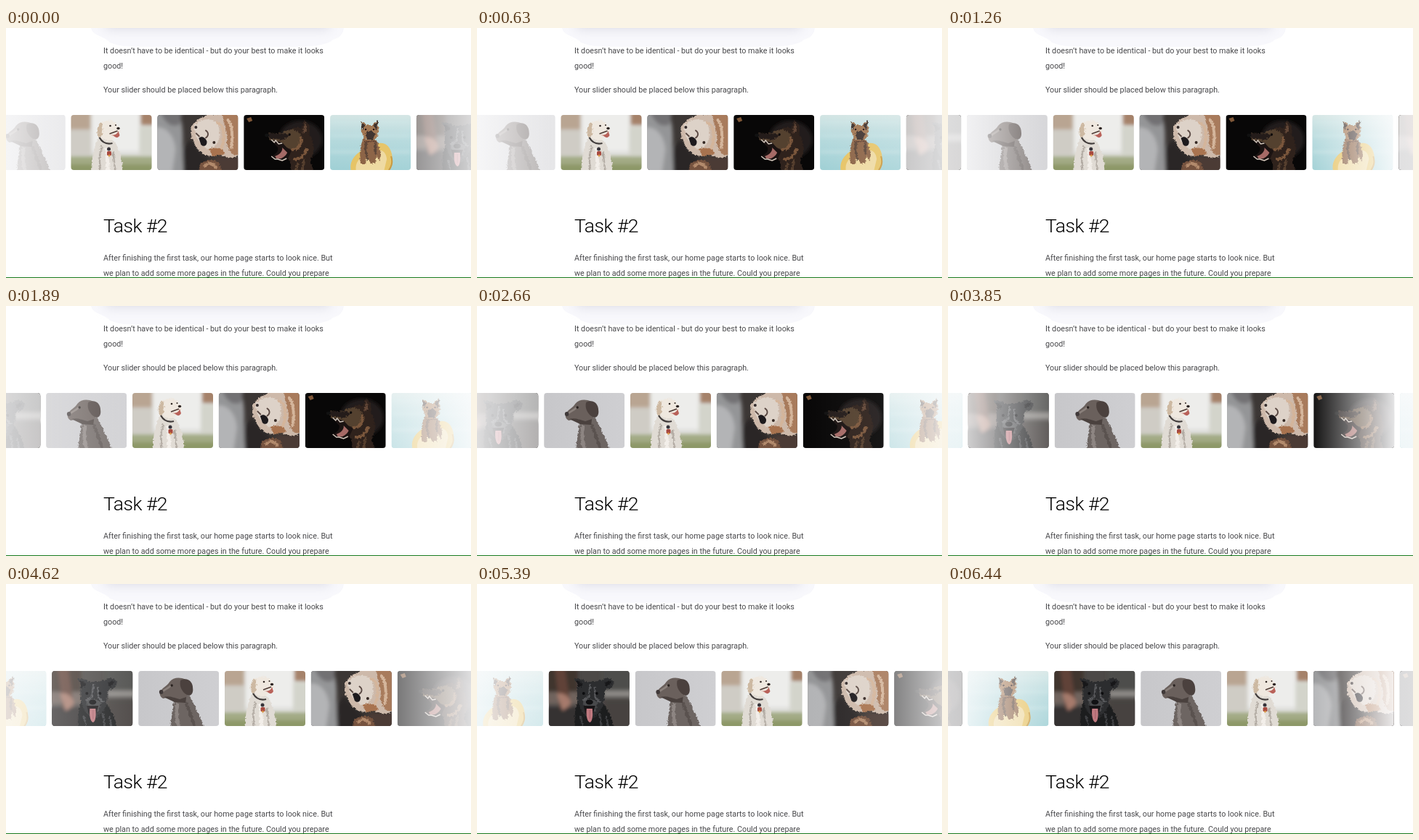
An HTML page that plays this animation: 640 px wide and 345 px high, repeating every 6510 ms.

```html
<!DOCTYPE html>
<html lang="en">
<head>
<meta charset="utf-8">
<title>Slider task</title>
<style>
  html, body { margin: 0; width: 100%; height: 100%; overflow: hidden; background: #fff; }
  svg { display: block; }
  .copy { font: 10.75px Roboto, sans-serif; fill: #48484b; }
  .title { font: 300 26.5px Roboto, sans-serif; letter-spacing: -.5px; fill: #000; }
</style>
</head>
<body>
<svg id="stage" width="640" height="345" viewBox="0 0 640 345" xmlns="http://www.w3.org/2000/svg">
  <defs>
    <clipPath id="frame"><rect width="111" height="76" rx="4"/></clipPath>
    <filter id="fur" x="-10%" y="-10%" width="120%" height="120%" color-interpolation-filters="sRGB">
      <feTurbulence baseFrequency=".22" numOctaves="2" seed="4" result="noise"/>
      <feDisplacementMap in="SourceGraphic" in2="noise" scale="4" xChannelSelector="R" yChannelSelector="G"/>
      <feGaussianBlur stdDeviation=".6"/>
    </filter>
    <filter id="soft" x="-10%" y="-10%" width="120%" height="120%"><feGaussianBlur stdDeviation=".6"/></filter>
    <filter id="blur" x="-20%" y="-20%" width="140%" height="140%"><feGaussianBlur stdDeviation="2.5"/></filter>
    <filter id="shade" x="-20%" y="-100%" width="140%" height="300%"><feGaussianBlur stdDeviation="8"/></filter>
    <linearGradient id="lake" x2="0" y2="1">
      <stop stop-color="#d3e5e4"/><stop offset=".4" stop-color="#b7dadd"/><stop offset="1" stop-color="#a0d0d5"/>
    </linearGradient>
    <linearGradient id="studio"><stop stop-color="#c7c7ca"/><stop offset="1" stop-color="#cfcfd2"/></linearGradient>

    <g id="puppy">
      <rect width="111" height="76" fill="#dededb"/>
      <g filter="url(#blur)">
        <path d="M-5-5H27V20H-5Z" fill="#b9a592"/>
        <path d="M-5 20H28V56H-5Z" fill="#cfccc5"/>
        <path d="M29-5H94V50H29Z" fill="#ededeb"/>
        <path d="M96-5H118V14H96Z" fill="#a5826a"/>
        <path d="M94 16H118V56H94Z" fill="#d3d4cb"/>
        <path d="M-5 57H118V82H-5Z" fill="#a3aa85"/>
        <path d="M-5 68H118V82H-5Z" fill="#8d9868"/>
      </g>
      <g filter="url(#fur)">
        <path d="M40 26C33 37 29 48 28 62L26 78H71C70 62 66 47 58 35Z" fill="#e0dbd4"/>
        <path d="M42 42C37 52 38 66 40 78M57 50L60 78" stroke="#b3aca4" stroke-width="2.5" fill="none"/>
        <path d="M48 44L50 78" stroke="#f2eee9" stroke-width="5"/>
        <path d="M36 16C38 8 46 6 54 7C60 8 63 13 66 17C68 21 66 26 61 27L56 33C49 36 42 34 39 28Z" fill="#efe8df"/>
        <path d="M41 10C35 13 33 21 36 29C40 31 43 25 43 18Z" fill="#cdb9a2"/>
      </g>
      <g filter="url(#soft)">
        <path d="M54 27C60 29 64 26 65 22L67 28C65 32 62 32 59 29Z" fill="#b9625a"/>
        <path d="M53 26L64 22" stroke="#4d3a34" stroke-width="1.5"/>
        <ellipse cx="65" cy="18.5" rx="2.2" ry="1.8" fill="#2b2423"/>
        <circle cx="54" cy="15" r="1.3" fill="#302724"/><circle cx="61.500" cy="14" r="1" fill="#302724"/>
        <path d="M39 31C43 38 49 41 57 39" stroke="#413c3b" stroke-width="2.2" fill="none"/>
        <circle cx="52" cy="47" r="2.5" fill="#36333a"/>
        <rect x="49.500" y="50" width="6" height="6" rx="1.500" fill="#a84a40"/>
        <circle cx="52.500" cy="56" r="1.500" fill="#d99848"/>
      </g>
    </g>

    <g id="fluffy">
      <rect width="111" height="76" fill="#3c3735"/>
      <g filter="url(#blur)">
        <path d="M-5-5H28C40 18 32 40 37 82H-5Z" fill="#949597"/>
        <path d="M-4 18C8 14 23 24 25 48L20 82H-5Z" fill="#b3b4b6"/>
        <path d="M4-5C10 12 20 18 31 13L34-5Z" fill="#727173"/>
        <path d="M36 46L46 34L72 62L70 82H36Z" fill="#2b2625"/>
        <path d="M80 58H116V82H76Z" fill="#4b3b34"/>
      </g>
      <g filter="url(#fur)">
        <path d="M47 13C55 2 67-2 85-2H113V54C104 60 92 58 84 53C75 58 61 56 56 48C49 39 42 26 47 13Z" fill="#cdb9aa"/>
        <path d="M88-2H113V56C100 54 93 46 95 30Z" fill="#a87b5c"/>
        <path d="M50 14C59 3 73 2 82 12C88 25 83 43 70 46C59 44 49 29 50 14Z" fill="#ddd2c8"/>
        <path d="M80 9C92 14 94 32 86 46M95 4C103 14 103 30 100 46" stroke="#d4b59b" stroke-width="4" fill="none"/>
        <path d="M70 46C80 41 90 45 91 53L75 56Z" fill="#a8734f"/>
        <path d="M57 68C66 59 77 60 84 65L88 78H56Z" fill="#76533f"/>
        <path d="M63 70C70 64 77 65 80 73" stroke="#b28a6c" stroke-width="4" fill="none"/>
      </g>
      <g filter="url(#soft)">
        <path d="M57 32C61 28 66 31 68 36C69 42 64 45 60 41Z" fill="#1d1a1d"/>
        <path d="M66 32C71 29 71 24 66 21M58 30L53 25" stroke="#594842" stroke-width="1.800" fill="none"/>
        <circle cx="53" cy="17" r="2" fill="#332b2b"/><circle cx="78" cy="38" r="2" fill="#342722"/>
      </g>
    </g>

    <g id="shepherd">
      <rect width="111" height="76" fill="#080707"/>
      <g filter="url(#blur)"><ellipse cx="78" cy="34" rx="30" ry="26" fill="#211e1d"/></g>
      <g filter="url(#fur)">
        <path d="M58 22C66 17 74 14 78 17L83 7C89 11 91 18 89 26C96 34 97 49 91 62L95 78H62C67 68 62 60 56 55L47 52L62 39Z" fill="#2f221c"/>
        <path d="M31 26C36 22 44 25 51 24C57 20 64 17 71 21C82 26 80 43 69 48C61 47 54 43 49 39L36 34Z" fill="#54412f"/>
        <path d="M31 26C38 21 47 26 55 24L63 28L51 34L35 31Z" fill="#241c1a"/>
        <path d="M65 47C74 47 80 38 77 29M68 60C75 62 83 55 86 45" stroke="#7b573c" stroke-width="4" fill="none"/>
        <path d="M83 9L86 21L80 25" fill="#614636"/>
        <path d="M74 65L71 76M82 60L80 76" stroke="#57402f" stroke-width="3"/>
      </g>
      <g filter="url(#soft)">
        <path d="M37 34L53 38C57 43 61 47 66 49L60 62L50 64L37 57C43 55 48 51 47 45Z" fill="#1b1312"/>
        <path d="M43 57C49 55 54 50 53 45L60 52C57 58 51 62 45 60Z" fill="#a56a66"/>
        <path d="M38 34L42 38L44 35L48 40L53 39M38 57L43 61L47 61L53 63L59 60" stroke="#d3c8bd" stroke-width="1.400" fill="none"/>
        <circle cx="63" cy="27" r="1.700" fill="#0d0a0a"/>
        <ellipse cx="32" cy="28" rx="3" ry="2.300" fill="#111"/>
        <path d="M4 5L10 3L12 8L7 10Z" fill="#7f5738"/>
      </g>
    </g>

    <g id="boat">
      <rect width="111" height="76" fill="url(#lake)"/>
      <path d="M0 10H111M0 29H111M0 51H111" stroke="#cce6e7" stroke-width="2" filter="url(#blur)"/>
      <g filter="url(#soft)">
        <path d="M29 78C25 63 37 49 57 43C71 34 82 40 85 54C87 64 83 72 79 78Z" fill="#e6c364"/>
        <path d="M36 78C33 65 42 56 57 51C70 45 77 50 78 61L74 78Z" fill="#eed9a0"/>
        <path d="M84 57C87 66 84 72 80 78" stroke="#c79538" stroke-width="2" fill="none"/>
      </g>
      <g filter="url(#fur)">
        <path d="M44 33C39 46 40 57 41 66H47L50 56L55 66H61L63 56L68 64C70 52 67 40 62 33Z" fill="#8a6143"/>
        <path d="M49 37C46 47 48 54 51 61M61 37L62 53" stroke="#594234" stroke-width="3" fill="none"/>
        <path d="M43 16L41 8C46 9 48 12 50 13H57L64 7L66 17C67 29 61 34 54 35C47 34 41 27 43 16Z" fill="#a0744f"/>
        <path d="M41 8L48 14L44 20ZM65 7L58 14L64 20Z" fill="#382c28"/>
        <path d="M48 24C52 20 57 20 61 25L58 33H50Z" fill="#3d302c"/>
        <path d="M46 36L62 35" stroke="#5b3b2d" stroke-width="1.800"/>
      </g>
      <circle cx="49" cy="20" r="1.300" fill="#211"/><circle cx="60" cy="20" r="1.300" fill="#211"/>
    </g>

    <g id="black">
      <rect width="111" height="76" fill="#4c4947"/>
      <g filter="url(#blur)">
        <path d="M-5-5H40V29H-5Z" fill="#40342f"/>
        <path d="M-5 29H42V46H-5Z" fill="#6f645d"/>
        <path d="M-5 50H43V82H-5Z" fill="#353130"/>
        <path d="M8-5H22L29 41L15 51Z" fill="#604239"/>
        <path d="M11 32C18 28 31 35 30 47L19 55Z" fill="#a67a6c"/>
        <path d="M73-5H116V26H73Z" fill="#4d4d4b"/>
        <path d="M75 27H116V36H75Z" fill="#8c8985"/>
        <path d="M76 40H116V82H76Z" fill="#464341"/>
      </g>
      <g filter="url(#fur)">
        <path d="M39 42C34 55 34 66 35 78H88C87 63 80 49 69 40Z" fill="#1c1d1e"/>
        <path d="M39 18L34 10C42 9 47 11 50 14H64L79 9C90 10 90 18 84 23L75 27C77 41 72 55 61 63L49 61C40 52 36 36 39 18Z" fill="#2c2d2f"/>
        <path d="M36 11L47 17L40 24ZM75 14L86 13L79 21Z" fill="#171719"/>
        <path d="M56 17L54 35L46 40M62 20L63 36L70 42" stroke="#58595c" stroke-width="2.500" fill="none"/>
        <path d="M46 41C51 37 60 37 67 42L63 56H51Z" fill="#48494b"/>
        <path d="M43 61L46 76M69 57L72 75M78 62L81 75" stroke="#404144" stroke-width="2"/>
      </g>
      <g filter="url(#soft)">
        <path d="M48 48H64L61 58C57 64 52 63 50 57Z" fill="#181517"/>
        <path d="M52 52H60C61 61 60 70 56.500 71C53 70 51 62 52 52Z" fill="#c07a80"/>
        <path d="M56.500 54V66" stroke="#a05c65" stroke-width=".8"/>
        <ellipse cx="56" cy="43" rx="5" ry="3.500" fill="#111113"/>
        <circle cx="48" cy="31" r="2" fill="#0c0c0e"/><circle cx="66" cy="31" r="2" fill="#0c0c0e"/>
      </g>
    </g>

    <g id="hound">
      <rect width="111" height="76" fill="url(#studio)"/>
      <g filter="url(#fur)">
        <path d="M48 33C48 46 44 60 43 78H89C86 62 78 53 72 36L63 29Z" fill="#6d6562"/>
        <path d="M53 43C50 57 52 67 55 78" stroke="#8d8582" stroke-width="5" fill="none"/>
        <path d="M65 42C68 56 74 64 77 78" stroke="#5a524f" stroke-width="4" fill="none"/>
      </g>
      <g filter="url(#soft)">
        <path d="M31 27C36 21 40 20 43 15C48 9 57 8 65 12C73 18 72 31 65 37C57 41 48 36 43 36L34 38C30 36 28 31 31 27Z" fill="#6a605c"/>
        <path d="M58 13C67 8 75 14 75 24C76 31 72 36 67 33C60 29 56 21 58 13Z" fill="#4b413e"/>
        <path d="M35 36C43 34 49 37 57 39L66 36L65 44L50 43Z" fill="#4a413e"/>
        <path d="M45 20C40 25 36 25 33 29" stroke="#8a807b" stroke-width="2.500" fill="none"/>
        <ellipse cx="31.500" cy="29" rx="2.800" ry="3" fill="#403939"/>
        <circle cx="46" cy="20" r="1.700" fill="#28211f"/>
      </g>
    </g>
  </defs>

  <rect width="640" height="345" fill="#fff"/>
  <path d="M117 0C119 11 137 12 143 20C163 28 181 25 200 26H407C427 25 443 23 450 16C461 13 464 7 465 0Z" fill="#f8f8fc"/>
  <rect x="137" y="-34" width="308" height="35" fill="#dadae4" filter="url(#shade)"/>

  <g class="copy">
    <text x="134" y="35">It doesn’t have to be identical - but do your best to make it looks</text>
    <text x="134" y="55.5">good!</text>
    <text x="134" y="88.5">Your slider should be placed below this paragraph.</text>
    <text x="134" y="321">After finishing the first task, our home page starts to look nice. But</text>
    <text x="134" y="341.5">we plan to add some more pages in the future. Could you prepare</text>
  </g>
  <text class="title" x="134" y="282">Task #2</text>
  <g id="track"></g>
  <rect y="344" width="640" height="1" fill="#187a1c"/>
</svg>

<script>
const LOOP = 6510, STEP = 70, PITCH = 118.85, WIDTH = 111;
const photos = ['puppy', 'fluffy', 'shepherd', 'boat', 'black', 'hound'];

// [time, left edge of the first photo]
const travel = [[0, 89.5], [630, 115.5], [1890, 174], [2660, 211], [3850, 265.5], [5390, 336.5], [6440, 384]];

// [card position, veil at its left edge, veil at its right edge]
const veil = [
  [-110, .9, .85], [-29, .93, .6], [-3, .88, .5], [27, .78, .15], [55, .35, .1], [85, 0, 0],
  [435, 0, 0], [473, 0, .18], [503, .05, .9], [530, .45, .9], [574, .5, .97], [595, .8, .97], [640, .9, .9]
];

function sample(keys, at, column = 1) {
  if (at <= keys[0][0]) return keys[0][column];
  const i = keys.findIndex(key => key[0] >= at);
  if (i < 0) return keys[keys.length - 1][column];
  const a = keys[i - 1], b = keys[i];
  return a[column] + (b[column] - a[column]) * (at - a[0]) / (b[0] - a[0]);
}

function make(tag, parent, attrs = {}) {
  const node = document.createElementNS('http://www.w3.org/2000/svg', tag);
  for (const name in attrs) node.setAttribute(name, attrs[name]);
  return parent.appendChild(node);
}

const track = document.getElementById('track');
const cards = Array.from({ length: 7 }, (_, i) => {
  const group = make('g', track, { 'clip-path': 'url(#frame)' });
  const photo = make('use', group);
  const gradient = make('linearGradient', group, { id: 'veil' + i });
  const stops = [0, 1].map(offset => make('stop', gradient, { offset, 'stop-color': '#fdfdfe' }));
  make('rect', group, { width: WIDTH, height: 76, fill: `url(#veil${i})` });
  return { group, photo, stops };
});

function draw(time) {
  const base = sample(travel, time);
  const first = Math.floor(-(base + WIDTH) / PITCH) + 1;
  cards.forEach(({ group, photo, stops }, i) => {
    const slot = first + i;
    const x = base + slot * PITCH;
    const href = '#' + photos[(slot + 12) % 6];
    group.setAttribute('transform', `translate(${x.toFixed(2)} 120)`);
    if (photo.getAttribute('href') !== href) photo.setAttribute('href', href);
    stops.forEach((stop, side) => stop.setAttribute('stop-opacity', sample(veil, x, side + 1)));
  });
}

let shown = -1;
function tick() {
  const time = Math.floor(performance.now() % LOOP / STEP) * STEP;
  if (time !== shown) draw(shown = time);
  requestAnimationFrame(tick);
}
tick();
</script>
</body>
</html>
```
